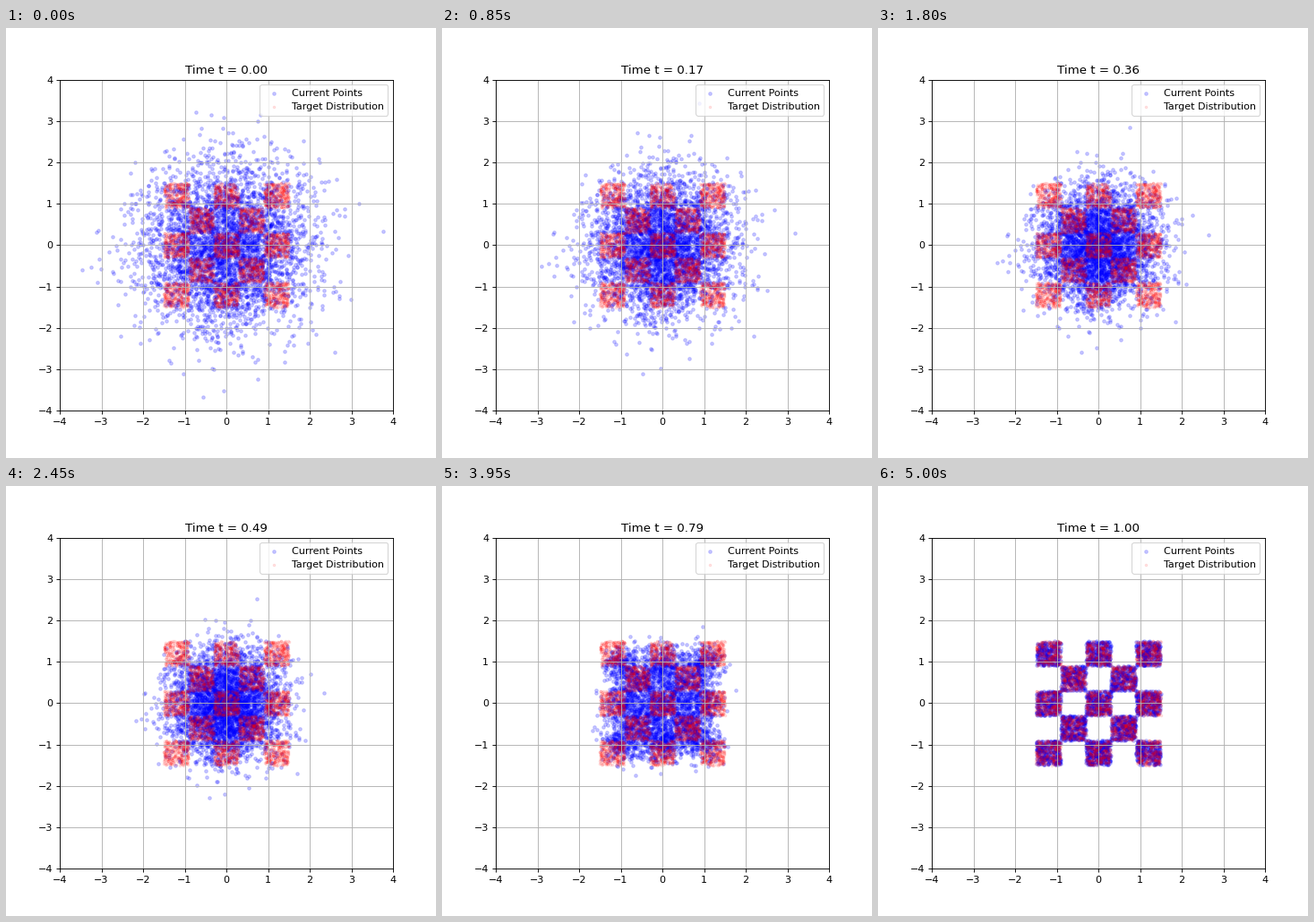
A matplotlib script that plays this animation: 480 by 480 pixels, repeating every 5.05 s.

```python
import math

import matplotlib.pyplot as plt
import numpy as np
from matplotlib.animation import FuncAnimation

STEPS = 100
COUNT = 4000
SIDE = 0.6
EDGES = SIDE * (np.arange(6) - 2.5)
BOARD = (np.indices((5, 5)).sum(axis=0) + 1) % 2

erf = np.vectorize(math.erf, otypes=[float])
rng = np.random.default_rng(7)


def interval_stats(x, t, s):
    """Mass and first moment of each board column, seen from positions x."""
    z = (t * EDGES - x[:, None]) / s
    cdf = erf(z / math.sqrt(2)) / 2
    pdf = np.exp(-z * z / 2) / math.sqrt(2 * math.pi)
    mass = np.diff(cdf, axis=1)
    moment = (x[:, None] * mass - s * np.diff(pdf, axis=1)) / t
    return mass, moment


def board_sum(a, b):
    return ((a @ BOARD) * b).sum(axis=1)


def expected_end(p, t):
    """Mean end point on the board for points now at p."""
    t = max(t, 1e-3)
    mx, fx = interval_stats(p[:, 0], t, 1 - t)
    my, fy = interval_stats(p[:, 1], t, 1 - t)
    total = board_sum(mx, my)[:, None]
    moment = np.stack([board_sum(fx, my), board_sum(mx, fy)], axis=1)
    end = np.where(total > 1e-9, moment / np.maximum(total, 1e-9), p / t)
    return np.clip(end, EDGES[0], EDGES[-1])


def flow(p):
    path = [p]
    for k in range(STEPS):
        p = p + (expected_end(p, k / STEPS) - p) / (STEPS - k)
        path.append(p)
    return path


def checkerboard(n):
    boxes = np.argwhere(BOARD)
    cells = boxes[rng.integers(len(boxes), size=n)]
    return EDGES[cells] + rng.uniform(0, SIDE, (n, 2))


path = flow(rng.standard_normal((COUNT, 2)))
target = checkerboard(COUNT)

fig, ax = plt.subplots(figsize=(6, 6), dpi=80)
current = ax.scatter(*path[0].T, s=10, c="blue", alpha=0.2, label="Current Points")
ax.scatter(*target.T, s=5, c="red", alpha=0.1, label="Target Distribution")
ax.set_xlim(-4, 4)
ax.set_ylim(-4, 4)
ax.grid(True)
ax.legend(loc="upper right")
title = ax.set_title("Time t = 0.00")


def update(k):
    current.set_offsets(path[k])
    title.set_text(f"Time t = {k / STEPS:.2f}")
    return current, title


anim = FuncAnimation(fig, update, frames=STEPS + 1, interval=50, repeat=True)
plt.show()
```
